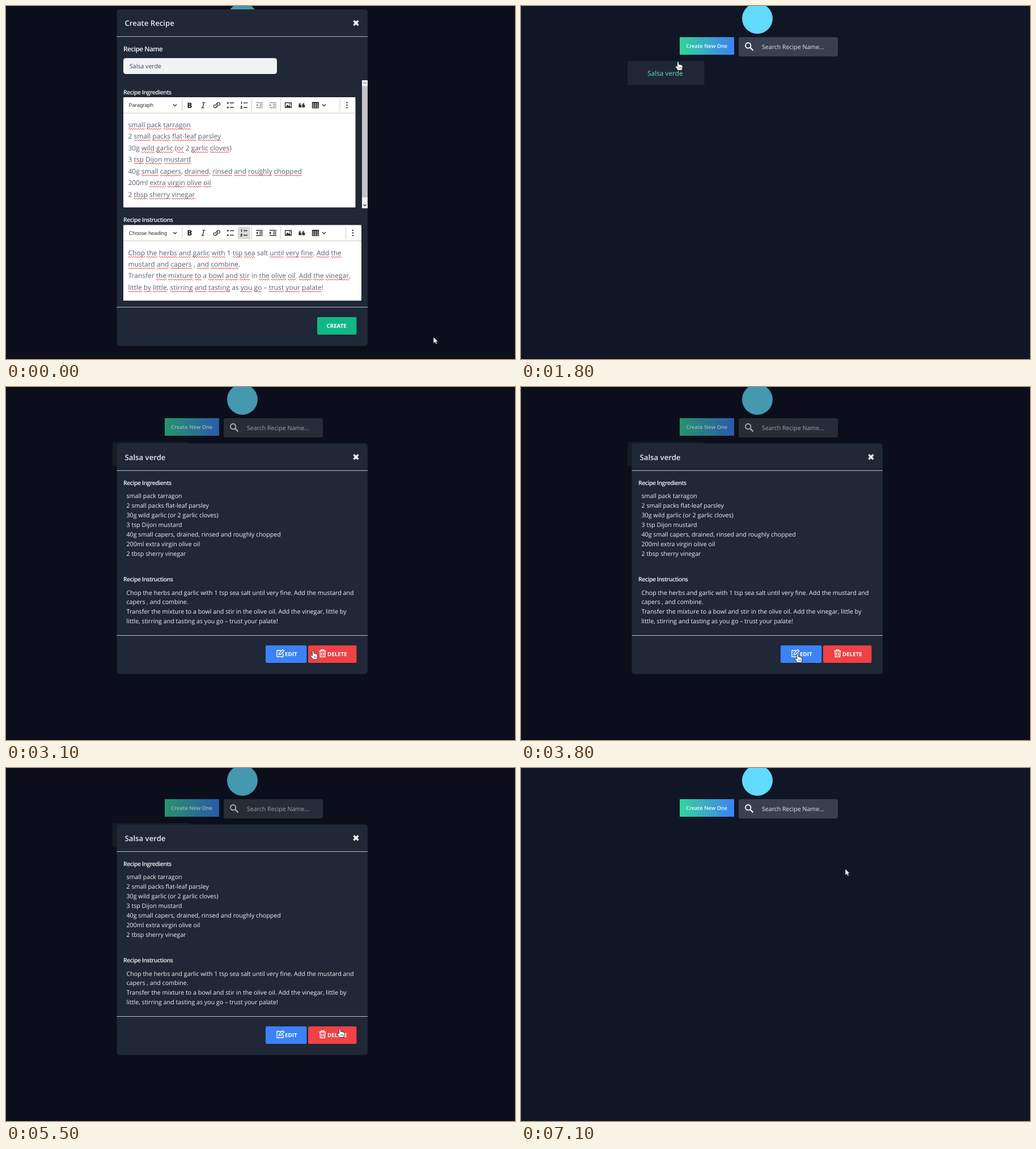
These frames come from a looping animation (898 by 623 pixels, 7.2 s). An HTML page:

```html
<!DOCTYPE html>
<html lang="en">
<head>
<meta charset="utf-8">
<title>Recipe box</title>
<style>
html, body { margin: 0; width: 100%; height: 100%; overflow: hidden; background: #111626; }
svg { display: block; width: 898px; height: 623px; }
text, p { font-family: "Open Sans", "Noto Sans", sans-serif; text-rendering: geometricPrecision; }
p { margin: 0; font-size: 12.03px; line-height: 20.45px; color: #596070; white-space: pre; }
u {
  text-decoration: none;
  background:
    linear-gradient(45deg, transparent 34%, #e5484d 34% 66%, transparent 66%) 0 100% / 4px 2px repeat-x,
    linear-gradient(-45deg, transparent 34%, #e5484d 34% 66%, transparent 66%) 2px 100% / 4px 2px repeat-x;
}
.ui { font-family: "Liberation Sans", Arial, sans-serif; }
.line { fill: none; stroke: currentColor; stroke-width: 1.4; }
</style>
</head>
<body>
<svg id="stage" viewBox="0 0 898 623" xmlns="http://www.w3.org/2000/svg"></svg>
<script>
const LOOP = 7200, STEP = 100;
const CREATED = 1300, OPENED = 2100, DELETED = 5900;

const ingredients = [
  'small pack tarragon',
  '2 small packs flat-leaf parsley',
  '30g wild garlic (or 2 garlic cloves)',
  '3 tsp Dijon mustard',
  '40g small capers, drained, rinsed and roughly chopped',
  '200ml extra virgin olive oil',
  '2 tbsp sherry vinegar'
];
const draft = [
  'Chop the herbs and garlic with 1 tsp sea salt until very fine. Add the',
  'mustard and capers , and combine.',
  'Transfer the mixture to a bowl and stir in the olive oil. Add the vinegar,',
  'little by little, stirring and tasting as you go – trust your palate!'
];
const steps = [
  'Chop the herbs and garlic with 1 tsp sea salt until very fine. Add the mustard and',
  'capers , and combine.',
  'Transfer the mixture to a bowl and stir in the olive oil. Add the vinegar, little by',
  'little, stirring and tasting as you go – trust your palate!'
];

const rect = (x, y, w, h, fill, r = 0) =>
  `<rect x="${x}" y="${y}" width="${w}" height="${h}" rx="${r}" fill="${fill}"/>`;
const text = (x, y, size, fill, str, weight = 400, extra = '') =>
  `<text x="${x}" y="${y}" font-size="${size}" fill="${fill}" font-weight="${weight}" ${extra}>${str}</text>`;
const path = (d, extra = '') => `<path class="line" d="${d}" ${extra}/>`;
const at = (x, y, body, color = '#333') =>
  `<g transform="translate(${x} ${y})" color="${color}">${body}</g>`;
const label = (y, str, size = 10.5) =>
  text(207, y, size, '#f3f4f6', str, 600, 'letter-spacing="-.5"');

const rows = 'M-1-4H6M-1 4H6';
const indent = 'M-6-4.5H6M0-1.5H6M0 1.5H6M-6 4.5H6';
const icons = {
  chevron: path('M-3-1.5L0 1.5L3-1.5'),
  bold: text(-4.6, 4.8, 13.2, '#333', 'B', 800),
  italic: path('M-1.5-4.6H3.5M-3.5 4.6H1.5M1.2-4.6L-1.2 4.6'),
  link: path('M-1 2A2.8 2.8 0 0 1-1-1.8L1.4-4.1A2.7 2.7 0 0 1 5.1-.3L3.8 1M1-2A2.8 2.8 0 0 1 1 1.8L-1.4 4.1A2.7 2.7 0 0 1-5.1 .3L-3.8-1'),
  bullets: path(rows) + '<circle cx="-4.6" cy="-4" r="1.6"/><circle cx="-4.6" cy="4" r="1.6"/>',
  numbers: path(rows) + path('M-5.4-5.6H-4.4V-1.8M-6 2.2H-3.8L-5.6 5.6H-3.2', 'stroke-width="1"'),
  outdent: path(indent) + '<path d="M-6 0L-2.5-2.5V2.5Z"/>',
  indent: path(indent) + '<path d="M-2.5 0L-6-2.5V2.5Z"/>',
  image: path('M-5.4-4.3H5.4V4.3H-5.4Z') + '<path d="M-4.3 3.4L-1.6-1.2L.5 1.4L2.2-.2L4.4 3.4Z"/><circle cx="2.6" cy="-1.9" r="1.1"/>',
  quote: '<path d="M-5.6 4V.2Q-5.4-3.4-1.4-4.2Q-3-2.6-3-.7H-.8V4ZM.5 4V.2Q.7-3.4 4.7-4.2Q3.1-2.6 3.1-.7H5.3V4Z"/>',
  table: path('M-5.4-4.8H5.4V4.8H-5.4ZM-5.4-1.2H5.4M-5.4 1.8H5.4M-1.8-4V4.8M1.8-4V4.8', 'stroke-width="1.1"') +
    '<path d="M-5.4-5.2H5.4V-3H-5.4Z"/>',
  dots: [-4.4, 0, 4.4].map(y => `<circle cy="${y}" r="1.25"/>`).join('')
};
const bar = [['chevron', 298], ['bold', 324], ['italic', 348], ['link', 372], ['bullets', 396],
  ['numbers', 420], ['outdent', 447], ['indent', 471], ['image', 498], ['quote', 522],
  ['table', 546], ['chevron', 561]];

const spell = str =>
  str.replace(/\b(?!(?:salt|in|as|Transfer)\b)[A-Za-z][A-Za-z-]+\b/g, '<u>$&</u>');

function editor(y, w, h, heading, lines, listOn) {
  const mid = y + 14, right = 207 + w;
  const rules = [311, 433.5, 484.5, right - 27.5]
    .map(x => rect(x - .5, y + 3, 1, 22, '#ccc')).join('');
  const tools = bar.map(([name, x]) =>
    at(x, mid, icons[name], !listOn && /dent/.test(name) ? '#999' : '#333')
      .replace('<g ', '<g fill="currentColor" ')).join('');
  return rect(207, y, w, h, '#fff', 1) +
    rect(207, y + 27.5, w, 1, '#c9c9cc') +
    (listOn ? rect(409, y + 3, 22, 22, '#dadada', 1) : '') +
    text(216.5, mid + 3.2, 9.3, '#333', heading, 400, 'class="ui"') +
    rules + tools + at(right - 15, mid, `<g fill="#333">${icons.dots}</g>`) +
    `<foreignObject x="215.5" y="${y + 39}" width="${w - 10}" height="${h - 40}">` +
    `<p xmlns="http://www.w3.org/1999/xhtml">${lines.map(spell).join('<br/>')}</p></foreignObject>`;
}

const dialog = (top, bottom, title, cut) =>
  rect(195.5, top, 442.5, bottom - top, '#202736', 5) +
  text(209.5, top + 29.2, 13.2, '#e8eaee', title, 600) +
  at(617.5, top + 24, path('M-4-4L4 4M4-4L-4 4', 'style="stroke-width:3.2"'), '#fff') +
  rect(195.5, top + 47.5, 442.5, 1, '#b9bec8') +
  rect(195.5, cut, 442.5, 1, '#b9bec8');

const button = (x, y, w, fill, tx, str) =>
  rect(x, y + 1, w, 31, '#151b28', 3) + rect(x, y, w, 31, fill, 2.5) +
  text(tx, y + 19, 9.75, '#fff', str, 700);

const list = (top, lines) =>
  lines.map((s, i) => text(212.5, top + i * 16.95, 10.7, '#f3f4f6', s)).join('');

const page =
  '<circle cx="417" cy="22" r="27" fill="#61dafb"/>' +
  rect(280, 55, 96, 31, 'url(#mint)') +
  text(291.3, 74, 9.3, '#f4fbff', 'Create New One', 600) +
  rect(384, 55, 175, 34, '#384050', 4) +
  at(402.5, 71.5, '<circle class="line" cx="-1.8" cy="-1.8" r="4.7" style="stroke-width:1.8"/>' +
    path('M1.8 1.8L7 7', 'style="stroke-width:2.2"'), '#fff') +
  text(425, 76, 10.6, '#e3e5e9', 'Search Recipe Name...');

const card = rect(188, 97, 135.5, 42.5, '#1f2735', 3) +
  text(223, 123, 11.9, '#62e3b0', 'Salsa verde', 500);

const form = dialog(6, 600, 'Create Recipe', 531) +
  label(80, 'Recipe Name', 11.8) +
  rect(207, 92, 271, 28, '#f1f3f7', 4.5) +
  text(218, 110, 10.6, '#374151', 'Salsa verde') +
  label(156, 'Recipe Ingredients') +
  editor(161, 409.5, 194.5, 'Paragraph', ingredients, false) +
  rect(628, 131, 10, 226, '#f1f1f1') + rect(628, 141, 10, 196.5, '#c4c4c6') +
  at(633, 136, path('M-2.5 1.2L0-1.2L2.5 1.2'), '#999') +
  at(633, 351.5, path('M-2.5-1.2L0 1.2L2.5-1.2'), '#444') +
  label(381, 'Recipe Instructions') +
  editor(386.5, 420, 133.5, 'Choose heading', draft, true) +
  button(549, 549, 69.5, '#11b785', 565.5, 'CREATE');

const view = dialog(99.5, 506.5, 'Salsa verde', 438) +
  label(172.5, 'Recipe Ingredients') + list(195.8, ingredients) +
  label(343, 'Recipe Instructions') + list(366.5, steps) +
  button(458, 456, 72.5, '#3b82f6', 492, 'EDIT') +
  at(484, 470, path('M1-5H-6V6H5V0M-2.5 2.5L-2-.5L4-6.5L6.5-4L.5 2Z'), '#fff') +
  button(533, 456, 85.5, '#ef4146', 567, 'DELETE') +
  at(558.5, 470, path('M-6-4H6M-2.5-4V-6.3H2.5V-4M-4.5-4L-4 6.3H4L4.5-4M-1.6-1.5V4M1.6-1.5V4'), '#fff');

const pointers = {
  arrow: '<path d="M0 0V11.5L2.7 9L4.6 13L6.5 12.1L4.7 8.2H8.2Z" fill="#fff" stroke="#1b1f28" stroke-width=".8"/>',
  hand: '<path d="M-1.4 1Q0-.8 1.4 1V5.2Q3 4.4 3.9 5.6Q5.2 5 6 6.2Q7.8 5.8 8 7.6V11Q7.8 13.5 6.3 15.6H-.4Q-1.2 13.6-3.9 10.6Q-5.2 8.4-3.4 8.1Q-2.4 8-1.4 9.3Z" fill="#fff" stroke="#1b1f28" stroke-width=".9"/>' +
    '<path d="M1.6 9.8V13M3.6 9.8V13M5.5 9.8V13" stroke="#444" stroke-width=".7"/>',
  beam: '<path d="M-2-5H2M0-5V5M-2 5H2" fill="none" stroke="#b9bec6" stroke-width="1"/>'
};

// time, x, y, pointer shape from that time on
const track = [
  [0, 754, 584, 'arrow'], [200, 745, 583, 'arrow'], [800, 603, 564, 'arrow'],
  [1000, 595, 561, 'arrow'], [1300, 595, 561, 'arrow'], [1600, 330, 185, 'arrow'],
  [1800, 277, 98, 'hand'], [2000, 271, 113, 'hand'], [2200, 272, 124, 'beam'],
  [2400, 273, 126, 'arrow'], [2900, 484, 463, 'hand'], [3200, 562, 466, 'hand'],
  [3500, 572, 468, 'hand'], [3800, 488, 471, 'hand'], [4200, 490, 470, 'hand'],
  [4600, 580, 466, 'hand'], [5000, 588, 462, 'hand'], [5500, 589, 460, 'hand'],
  [5900, 589, 460, 'arrow'], [6400, 668, 258, 'arrow'], [6600, 660, 246, 'arrow'],
  [7000, 572, 178, 'arrow'], [7200, 572, 178, 'arrow']
];

const group = (id, body) => `<g id="${id}">${body}</g>`;
document.getElementById('stage').innerHTML =
  '<defs><linearGradient id="mint"><stop stop-color="#34d399"/><stop offset="1" stop-color="#3b82f6"/></linearGradient></defs>' +
  rect(0, 0, 898, 623, '#111626') + page + group('card', card) +
  group('shade', rect(0, 0, 898, 623, 'rgba(0,0,0,.3)')) +
  group('form', form) + group('view', view) +
  group('pointer', Object.keys(pointers).map(k => group(k, pointers[k])).join(''));

const el = id => document.getElementById(id);
const show = (id, on) => { el(id).style.display = on ? '' : 'none'; };

function draw(t) {
  const creating = t < CREATED, viewing = t >= OPENED && t < DELETED;
  show('card', t >= CREATED && t < DELETED);
  show('shade', creating || viewing);
  show('form', creating);
  show('view', viewing);

  const i = track.findIndex(k => k[0] > t);
  const [t0, x0, y0, shape] = track[i - 1], [t1, x1, y1] = track[i];
  const p = (t - t0) / (t1 - t0), e = p * p * (3 - 2 * p);
  el('pointer').setAttribute('transform', `translate(${x0 + (x1 - x0) * e} ${y0 + (y1 - y0) * e})`);
  Object.keys(pointers).forEach(k => show(k, k === shape));
}

const start = performance.now();
function tick() {
  const t = (performance.now() - start) % LOOP;
  draw(Math.floor(t / STEP) * STEP);
  requestAnimationFrame(tick);
}
tick();
</script>
</body>
</html>
```
